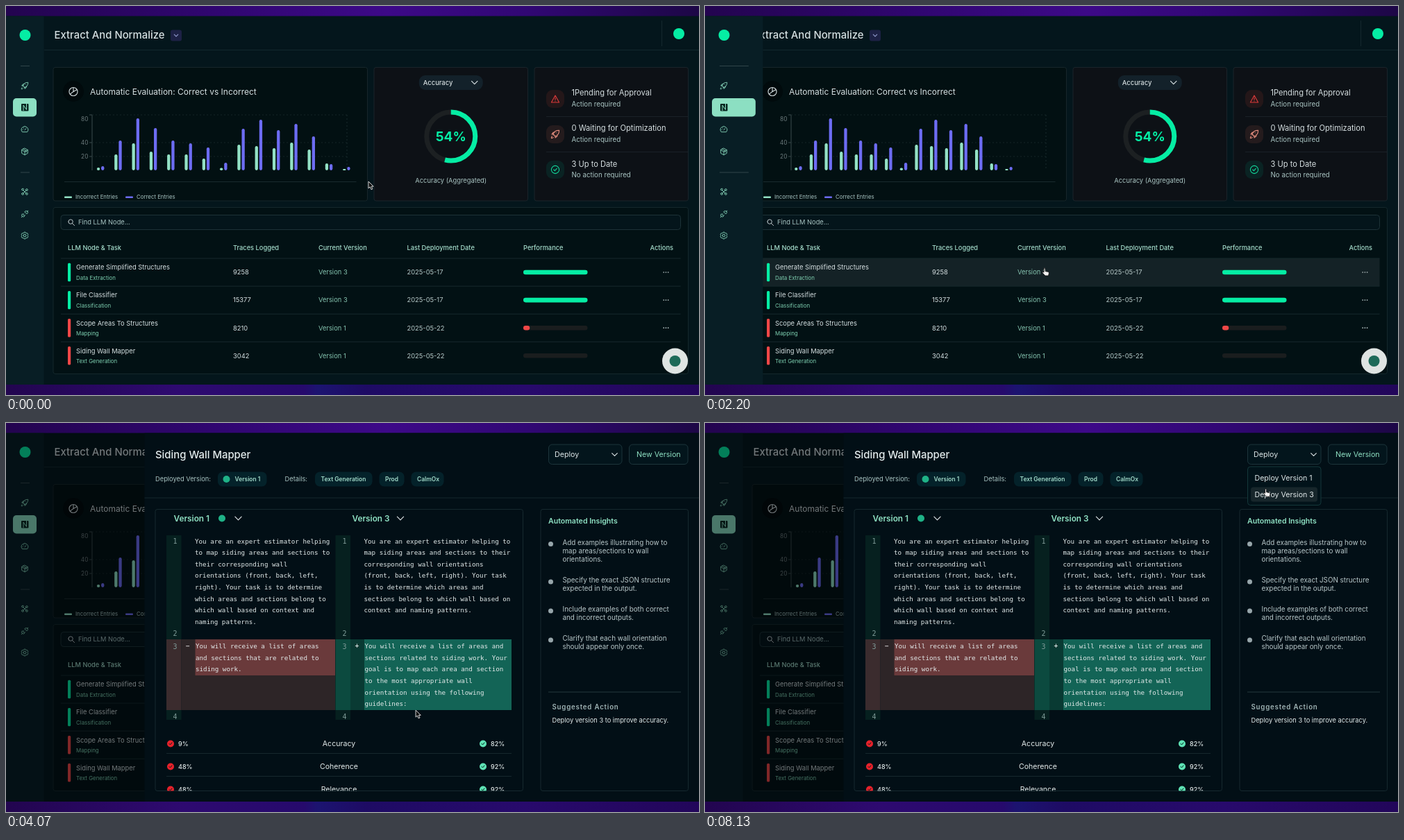
Recreate the animation shown at these times as an HTML page. Size 998 px wide and 561 px high, loop 8.2 s.

```html
<!DOCTYPE html>
<html lang="en">
<head>
<meta charset="utf-8">
<title>Node dashboard</title>
<style>
html, body { margin: 0; width: 100%; height: 100%; overflow: hidden; background: #04161c; }
svg { display: block; width: 998px; height: 561px; font-family: Inter, "Liberation Sans", sans-serif; }
.mono { font-family: "DejaVu Sans Mono", "Liberation Mono", monospace; }
.icon { fill: none; stroke-width: 1.9; stroke-linecap: round; stroke-linejoin: round; }
</style>
</head>
<body>
<svg viewBox="0 0 998 561">
  <defs>
    <linearGradient id="top">
      <stop offset="0" stop-color="#23044f"/><stop offset=".3" stop-color="#300670"/>
      <stop offset=".55" stop-color="#3d0988"/><stop offset=".75" stop-color="#310774"/>
      <stop offset="1" stop-color="#1d0746"/>
    </linearGradient>
    <linearGradient id="bottom">
      <stop offset="0" stop-color="#22054f"/><stop offset=".25" stop-color="#2e0a70"/>
      <stop offset=".43" stop-color="#260a6c"/><stop offset=".45" stop-color="#1c1470"/>
      <stop offset=".52" stop-color="#1e0b64"/><stop offset=".75" stop-color="#280a6c"/>
      <stop offset="1" stop-color="#22065a"/>
    </linearGradient>
    <clipPath id="app"><rect y="14.5" width="998" height="531.5"/></clipPath>
    <clipPath id="diffBox"><rect x="215" y="125" width="530" height="405.5"/></clipPath>
    <clipPath id="sideBox"><rect id="sideClip" y="60" width="54.5" height="486"/></clipPath>
  </defs>
  <rect width="998" height="16" fill="url(#top)"/>
  <rect y="544" width="998" height="17" fill="url(#bottom)"/>
  <g clip-path="url(#app)">
    <rect y="14" width="998" height="532" fill="#04161c"/>
    <g id="main"></g>
    <g id="side"></g>
    <rect id="shade" y="14" width="998" height="532"/>
    <g id="panel"></g>
  </g>
  <g id="cursor"></g>
</svg>
<script>
const LOOP = 8200;
const PANEL_AT = 2950, LOADED_AT = 3900, MENU_AT = 6000;
const OPEN_AT = 1000, CLOSE_AT = 1930;
const GREEN = '#05eda4', MINT = '#8fe0c3', PALE = '#d6dfe1', SOFT = '#a9c4c2', LINE = '#16292e', RED = '#f04747';

const $ = id => document.getElementById(id);
const clamp = v => Math.max(0, Math.min(1, v));
const mix = (a, b, p) => a + (b - a) * p;
const smooth = p => p * p * (3 - 2 * p);

// Text is placed by the middle of its capitals.
const text = (x, y, str, size, fill = PALE, attrs = '') =>
  `<text x="${x}" y="${y + size * .36}" font-size="${size}" fill="${fill}" ${attrs}>${str}</text>`;
const bold = (x, y, str, size, fill, weight = 600, attrs = '') =>
  text(x, y, str, size, fill, `font-weight="${weight}" ${attrs}`);
const box = (x, y, x2, y2, fill, r = 0, stroke = 'none') =>
  `<rect x="${x}" y="${y}" width="${x2 - x}" height="${y2 - y}" rx="${r}" fill="${fill}" stroke="${stroke}"/>`;
const line = (x, y, x2, y2, stroke = LINE, attrs = '') =>
  `<path d="M${x} ${y}L${x2} ${y2}" stroke="${stroke}" ${attrs}/>`;
const dot = (x, y, r, fill) => `<circle cx="${x}" cy="${y}" r="${r}" fill="${fill}"/>`;
const chevron = (x, y, r, stroke) =>
  `<path class="icon" d="M${x - r} ${y - r / 2}l${r} ${r}l${r} ${-r}" stroke="${stroke}" style="stroke-width:1.2"/>`;
const icon = (name, x, y, size, stroke) =>
  `<path class="icon" d="${ICONS[name]}" stroke="${stroke}" transform="translate(${x - size / 2} ${y - size / 2}) scale(${size / 24})"/>`;

const ICONS = {
  rocket: 'M9 15l-3-3c2-6 7-10 16-10c0 8-4 13-10 16zM9 12H3l4-5h4M12 15v6l5-4v-4M4 17c-2 1-2 5-2 5s4 0 5-2M15 8h.1',
  gauge: 'M4 19a10 10 0 1 1 16 0zM12 14l4-5M6 13h.1M9 8h.1',
  cube: 'M12 2l9 5v10l-9 5l-9-5V7zM3 7l9 5l9-5M12 12v10M7.500 4.500l9 5v4',
  nodes: 'M8 8l8 8M16 8l-8 8M3 5a3 3 0 1 0 6 0a3 3 0 1 0-6 0M15 6a3 3 0 1 0 6 0a3 3 0 1 0-6 0M3 18a3 3 0 1 0 6 0a3 3 0 1 0-6 0M15 18a3 3 0 1 0 6 0a3 3 0 1 0-6 0',
  plug: 'M2 22l4-4M6 12l6 6l-3 2q-3 1-5-1t-1-5zM12 6l6 6l3-3q1-3-1-5t-5-1zM18 6l4-4M9 11l-2 2M13 15l-2 2',
  gear: 'M9 4l1-2h4l1 2l3 1l2 0l2 4l-1 2v2l1 2l-2 4h-2l-3 1l-1 2h-4l-1-2l-3-1h-2l-2-4l1-2v-2l-1-2l2-4h2zM8 12a4 4 0 1 0 8 0a4 4 0 1 0-8 0',
  alert: 'M12 3L2 21h20zM12 9v5M12 17.500v.1',
  check: 'M2 12a10 10 0 1 0 20 0a10 10 0 1 0-20 0M8 12l3 3l5-6',
  pie: 'M2 12a10 10 0 1 0 20 0a10 10 0 1 0-20 0M12 2v10l9-5M12 12l-8 6',
  search: 'M3 10a7 7 0 1 0 14 0a7 7 0 1 0-14 0M15 15l7 7'
};

const BARS = [[4, 6], [23, 43], [39, 75], [27, 61], [23, 43], [23, 39], [17, 33], [3.500, 11],
  [37, 60], [35, 73], [32, 58], [40, 67], [30, 49], [10, 9], [2, 5]];
const ROWS = [
  ['Generate Simplified Structures', 'Data Extraction', 9258, 3, '2025-05-17', 1],
  ['File Classifier', 'Classification', 15377, 3, '2025-05-17', 1],
  ['Scope Areas To Structures', 'Mapping', 8210, 1, '2025-05-22', .1],
  ['Siding Wall Mapper', 'Text Generation', 3042, 1, '2025-05-22', 0]];

function chart(pick, step) {
  const axis = pick(124, 259.5), base = pick(237, 236), unit = pick(1, .83), right = pick(491, 565);
  const dash = 'stroke-dasharray="2 3"';
  let s = line(axis, base - 80 * unit, axis, base, '#3a4a4d') + line(right, base - 80 * unit, right, base, '#182a2c', dash);
  for (const v of [20, 40, 80]) {
    const y = base - v * unit;
    s += line(axis, y, right, y, '#142527', dash) + line(axis - 4, y, axis, y, '#3a4a4d');
    s += text(axis - 5.5, v === 80 ? y + 6 : y, v, pick(8.4, 7.4), '#6c7a7c', 'text-anchor="end"');
  }
  // Bars take their new width at once; only their spacing eases.
  const w = pick(4.3, 3.6), gap = pick(6.2, 5.2);
  BARS.forEach((pair, i) => pair.forEach((v, j) => {
    const x = axis + step * (.48 + i) + (j - .5) * gap;
    s += box(x - w / 2, base - v * unit, x + w / 2, base, j ? '#6d6cf3' : '#93e2c5', Math.min(w / 2, v * unit / 2));
  }));
  return s;
}

function statusCard(pick, left) {
  const x = pick(814.5, 850), ix = pick(791, 826);
  const entries = [
    ['alert', '#e23b3b', '#241719', ['1Pending for Approval'], 'Action required', pick(134, 133), pick(125, 124.5), pick(141, 140.5)],
    ['rocket', '#e08a7c', '#241b1d', pick(['0 Waiting for Optimization'], ['0 Waiting for', 'Optimization']), 'Action required', pick(185, 190.5), 176, pick(192, 203.5)],
    ['check', '#12d69a', '#0a2323', ['3 Up to Date'], 'No action required', pick(236, 247.5), pick(227.5, 239), pick(243.5, 255)]];
  let s = '';
  for (const [name, color, back, title, note, iy, ty, ny] of entries) {
    s += box(ix - 13, iy - 13, ix + 13, iy + 13, back, 9) + icon(name, ix, iy, 13.5, color);
    title.forEach((row, i) => s += text(x, ty + i * 12, row, 11.12));
    s += text(x, ny, note, 9.75, SOFT);
  }
  for (const y of pick([159.5, 210.5], [158.5, 221.5])) s += line(left + 17, y, 982, y, '#1a2127');
  return s;
}

function mainView(wide, step, hover) {
  const pick = (a, b) => wide ? b : a, dy = pick(0, 5.5), foot = 281 + dy;
  const left = pick(68, 210.5), [c1, c2, c3] = pick([520.5, 530, 751.5], [592, 601, 787]), right3 = pick(761, 797);
  const cols = pick([89, 327, 450, 577.5, 745], [232, 432, 535, 642, 783]);
  let s = line(pick(55, 184), 63.5, 998, 63.5, '#12272d') + line(944.5, 21, 944.5, 58, '#14282e');
  s += bold(left + 1.5, 42, 'Extract And Normalize', 14.87, PALE, 500);
  s += box(left + 169, 34.5, left + 185, 50.5, '#1d2145', 3) + chevron(left + 177, 42.5, 2.7, '#8f98c9');
  s += dot(969, 40, 8, GREEN);

  s += box(left, 88.5 + dy, c1, foot, '#021012', 3, '#17262a');
  s += dot(left + 29, 123 + dy, 15, '#010a0c') + icon('pie', left + 29, 123.5 + dy, 14.5, '#d0d8da');
  s += text(left + 53, 123.5 + dy, 'Automatic Evaluation: Correct vs Incorrect', 12);
  s += chart(pick, step);
  s += line(left + 16, 253.5 + dy, c1 - 16, 253.5 + dy, '#1a2b2e');
  s += box(left + 16, 274.5 + dy, left + 27, 277 + dy, '#93e2c5', 1) + text(left + 32, 275.5 + dy, 'Incorrect Entries', 7.85, SOFT);
  s += box(left + 104, 274.5 + dy, left + 115, 277 + dy, '#6d6cf3', 1) + text(left + 120, 275.5 + dy, 'Correct Entries', 7.85, SOFT);

  const mid = (c2 + c3) / 2, cy = 188 + dy;
  s += box(c2, 88.5 + dy, c3, foot, '#0d1116', 3, '#1a242a');
  s += box(mid - 46, 100 + dy, mid + 46, 121 + dy, '#13212a', 9) + bold(mid - 40, 110.5 + dy, 'Accuracy', 9.4, PALE, 500);
  s += chevron(mid + 34, 110.5 + dy, 4.2, PALE);
  s += `<circle cx="${mid}" cy="${cy}" r="35" fill="none" stroke="#1c2022" stroke-width="7"/>`;
  s += `<circle cx="${mid}" cy="${cy}" r="35" fill="none" stroke="${GREEN}" stroke-width="7" pathLength="100" stroke-dasharray="54 46" transform="rotate(-90 ${mid} ${cy})"/>`;
  s += bold(mid, cy, '54%', 19, GREEN, 700, 'text-anchor="middle"');
  s += text(mid, 252 + dy, 'Accuracy (Aggregated)', 9.34, SOFT, 'text-anchor="middle"');

  s += box(right3, 88.5 + dy, 982.5, foot, '#0d1116', 3, '#1a242a') + statusCard(pick, right3);

  let t = box(left, 290.5, 982.5, 530.5, '#021114', 3, '#14282c');
  t += box(left + 11, 301.5, 971.5, 322.5, '#04151b', 4, '#1d3237') + icon('search', left + 26, 312, 11, PALE);
  t += text(left + 36, 312, 'Find LLM Node...', 9.3, SOFT);
  ['LLM Node &amp; Task', 'Traces Logged', 'Current Version', 'Last Deployment Date', 'Performance'].forEach((name, i) =>
    t += bold(cols[i], 348.5, name, 9.27, '#a5dccb', 500));
  t += bold(927.5, 348.5, 'Actions', 9.27, '#a5dccb', 500);
  ROWS.forEach(([name, task, count, version, date, score], i) => {
    const y = 384 + i * 40.1, tone = i < 2 ? GREEN : RED;
    if (i === hover) t += box(left + 11, y - 20, 971.5, y + 20, '#142226');
    t += line(left + 11, y - 20, 971.5, y - 20, '#17292d');
    t += box(cols[0], y - 13.2, cols[0] + 4.2, y + 13.2, tone, 1.5);
    t += text(cols[0] + 12, y - 7, name, 9.34) + text(cols[0] + 12, y + 8, task, 7.9, '#7fd0b1');
    t += text(cols[1], y, count, 9.35) + text(cols[2], y, 'Version ' + version, 9.35, '#86c4b0') + text(cols[3], y, date, 9.35, '#b9cbca');
    t += box(cols[4], y - 3.3, cols[4] + 92.5, y + 3.3, '#1a1d1e', 3.3);
    if (score) t += box(cols[4], y - 3.3, cols[4] + 92.5 * score, y + 3.3, tone, 3.3);
    for (let d = 0; d < 3; d++) t += dot(947.2 + d * 3.2, y, .85, '#b9c5c6');
  });
  s += `<g transform="translate(0 ${dy})">${t}</g>`;
  return s + dot(963.5, 512, 18.5, '#dfe4e3') + dot(963.5, 512, 8, '#1d6a59');
}

const LINKS = [['rocket', 115, 'Agents'], ['', 146, 'Refinery'], ['gauge', 178, 'Evaluations'], ['cube', 210, 'Traces'],
  ['nodes', 268, 'Your Team'], ['plug', 300, 'Docs'], ['gear', 331, 'Settings']];

function sideView(width, labels) {
  let s = box(0, 14, width, 546, '#081e25') + dot(27.5, 42, 8, GREEN);
  s += box(10, 133, width - 10.5, 159.5, '#8cdfc2', 5);
  if (labels) s += bold(57, 42.5, 'JPlank', 9.25, MINT, 500) + chevron(96, 42, 3.6, MINT);
  let t = '';
  [['Dashboard', 86.5], ['General', 240]].forEach(([name, y]) =>
    t += labels ? text(10, y, name, 9.4, '#33484c') : line(21, y, width - 20.5, y, '#30454a'));
  for (const [name, y, label] of LINKS) {
    const ink = name ? '#86d3b8' : '#06251f';
    t += name ? icon(name, 27, y, 11.5, ink)
      : box(22, 141, 32.5, 151.5, ink, 1) + line(25, 143, 25, 151, '#8cdfc2') + line(25, 143, 29.5, 149.5, '#8cdfc2') + line(29.5, 141, 29.5, 149.5, '#8cdfc2');
    if (labels) t += text(39, y, label, 9.3, ink);
  }
  return s + `<g clip-path="url(#sideBox)">${t}</g>`;
}

const BEFORE = ['You are an expert estimator helping', 'to map siding areas and sections to', 'their corresponding wall',
  'orientations (front, back, left,', 'right). Your task is to determine', 'which areas and sections belong to',
  'which wall based on context and', 'naming patterns.'];
const AFTER = ['You are an expert estimator helping to', 'map siding areas and sections to their', 'corresponding wall orientations',
  '(front, back, left, right). Your task', 'is to determine which areas and', 'sections belong to which wall based on',
  'context and naming patterns.'];
const REMOVED = ['You will receive a list of areas', 'and sections that are related to', 'siding work.'];
const ADDED = ['You will receive a list of areas and', 'sections related to siding work. Your', 'goal is to map each area and section',
  'to the most appropriate wall', 'orientation using the following', 'guidelines:'];

function diffView(top) {
  const code = (x, y, rows) => rows.map((row, i) => text(x, y + i * 16.55, row, 9.22, '#e3eaea', 'class="mono"')).join('');
  const y3 = top + 151.5;
  let s = box(231, top - 8.5, 252.5, top + 257.5, '#06201f') + box(474.5, top - 8.5, 496, top + 257.5, '#06201f');
  s += box(231, y3 - 10, 252.5, y3 + 92, '#3b2c2e') + box(252.5, y3 - 10, 474, y3 + 92, '#2d2527') + box(272.5, y3 - 10, 474, y3 + 42, '#6a3a3b');
  s += box(474.5, y3 - 10, 496, y3 + 92, '#0c4a3f') + box(496, y3 - 10, 516, y3 + 92, '#093a33') + box(516, y3 - 10, 728, y3 + 92, '#136456');
  [0, 133, 151.5, 252.5].forEach((dy, i) => [240.5, 484.5].forEach(x =>
    s += text(x, top + dy, i + 1, 10, '#7f9b98', 'class="mono"')));
  s += text(259, y3, '−', 9.6, '#fff', 'class="mono"') + text(502.5, y3, '+', 9.6, '#fff', 'class="mono"');
  return s + code(272, top, BEFORE) + code(515.5, top, AFTER) + code(273, y3, REMOVED) + code(516.5, y3, ADDED);
}

function metricsView() {
  return [['Accuracy', 9, 82], ['Coherence', 48, 92], ['Relevance', 48, 92]].map(([name, a, b], i) => {
    const y = 462.5 + i * 33;
    const mark = (x, fill) => dot(x, y, 5, fill) + `<path class="icon" d="M${x - 2} ${y}l1.500 1.500l2.500-3" stroke="#04241d" style="stroke-width:1"/>`;
    return mark(237, '#e8212b') + mark(687, '#5fe3b5') + bold(248, y, a + '%', 9, '#e3eaea', 500) + bold(698, y, b + '%', 9, '#e3eaea', 500) +
      text(479.5, y, name, 10.6, '#e3eaea', 'text-anchor="middle"') + line(231, y + 14, 728, y + 14, '#16282d');
  }).join('');
}

const INSIGHTS = [[172, 'Add examples illustrating how to', 'map areas/sections to wall', 'orientations.'],
  [226.5, 'Specify the exact JSON structure', 'expected in the output.'],
  [268.5, 'Include examples of both correct', 'and incorrect outputs.'],
  [310.5, 'Clarify that each wall orientation', 'should appear only once.']];

function panelView(loaded, menu, item) {
  const pill = (x, x2, str, tx = x + 8.5) => box(x, 70.5, x2, 91.5, '#04222a', 7) + bold(tx, 81, str, 8.45, '#a3dccb');
  let s = box(199.5, 14, 1000, 546, '#020f16') + line(199.5, 108, 998, 108, '#14272d');
  s += bold(215, 45.5, 'Siding Wall Mapper', 14.87, '#e6edee', 500);
  s += box(781.5, 31, 887, 59.5, '#03151c', 5, '#1d353b') + text(790, 45.5, 'Deploy', 10.65, '#dfe7e8') + chevron(876.5, 45.5, 3.8, PALE);
  s += box(897.5, 31, 982, 59.5, '#03151c', 5, '#1d353b') + text(908, 45.5, 'New Version', 10.65, MINT);
  s += text(215, 81, 'Deployed Version:', 9.3, SOFT) + text(401.5, 81, 'Details:', 9.3, SOFT);
  s += pill(305, 375.5, 'Version 1', 329.5) + pill(445, 527.5, 'Text Generation') + pill(537.5, 573.5, 'Prod') + pill(583.5, 630.5, 'CalmOx');
  s += box(215, 124.5, 744.5, 530.5, '#020f16', 3, '#16292f') + box(770, 124.5, 982.5, 530.5, '#020f16', 3, '#16292f');

  const hy = loaded ? 137.5 : 170.5;
  let d = bold(241.5, hy, 'Version 1', 11.8, MINT) + bold(498.5, hy, 'Version 3', 11.8, MINT);
  d += chevron(334.5, hy, 4.6, PALE) + chevron(568, hy, 4.6, PALE) + diffView(loaded ? 170.5 : 231.5);
  if (loaded) {
    d += dot(311, hy, 5, '#1fb287') + metricsView();
    s += dot(317.5, 81, 5, '#1fb287');
  }
  s += `<g clip-path="url(#diffBox)">${d}</g>`;

  s += bold(781, 141.5, 'Automated Insights', 10.62, MINT);
  if (loaded) {
    for (const [y, ...rows] of INSIGHTS) {
      s += dot(784.5, y + 2.5, 3.5, '#97a6ab');
      rows.forEach((row, i) => s += text(801.5, y + i * 12, row, 9.83, '#b9c7c9'));
    }
  } else s += text(781, 166.5, 'Loading insights...', 10.6, '#8fc9b6');
  const ay = loaded ? 388 : 373.5;
  s += line(781, ay, 972, ay, '#24383d') + bold(786.5, ay + 22, 'Suggested Action', 9.7, '#9fb3b4', 600, 'letter-spacing=".8"');
  const advice = loaded ? ['Deploy version 3 to improve accuracy.'] : ['No action needed. Both versions perform', 'equally well in accuracy.'];
  advice.forEach((row, i) => s += text(786.5, ay + 40.5 + i * 14, row, 9.27, '#e3eaea'));

  if (menu) {
    s += box(781.5, 63, 887, 118.5, '#02131a', 4, '#14383a');
    [79, 103].forEach((y, i) => {
      if (i === item) s += box(786, y - 10.5, 882, y + 10.5, '#17262b', 4);
      s += text(791.5, y, 'Deploy Version ' + (i * 2 + 1), 10.62, '#dfe7e8');
    });
  }
  return s;
}

const POINTERS = {
  arrow: '<path d="M0 0v10l2.300-2.100l1.700 3.800l1.900-.8l-1.700-3.700h3z" fill="#111" stroke="#e8e8e8" stroke-width=".9"/>',
  hand: '<path d="M-1 1c0-1.600 2-1.600 2 0v3.500l3.700.8c1.500.3 1.800 1.200 1.600 2.600l-.7 3.100h-4.800l-3.600-4c-.8-1.200.5-2 1.800-.9z" fill="#f2f2f2" stroke="#111" stroke-width=".9"/>',
  beam: '<path d="M-2.500-5q2 0 2.500 1q.5-1 2.500-1M0-4v8M-2.500 5q2 0 2.500-1q.5 1 2.500 1M-1.500 1.500h3" fill="none" stroke="#c8d2d2" stroke-width="1"/>'
};
const SHAPES = [[0, 'arrow'], [940, 'hand'], [1900, 'arrow'], [2130, 'hand'], [3650, 'arrow'], [4600, 'beam'],
  [5150, 'arrow'], [5550, 'hand'], [6350, 'arrow'], [7650, 'hand']];
const ROUTE = [[0, 522, 253], [150, 515, 250], [950, 52, 150], [1070, 47, 148], [1600, 56, 160], [1930, 190, 245],
  [2200, 489, 378], [2750, 491, 495], [3600, 491, 495], [4600, 708, 318], [4930, 711, 315], [5700, 836, 47],
  [6150, 838, 47], [6800, 769, 91], [7200, 770, 96], [7800, 803, 97], [8200, 808, 95]];

function pointerAt(t) {
  const i = Math.max(1, ROUTE.findIndex(p => p[0] > t));
  const [a, b] = [ROUTE[i - 1], ROUTE[i]];
  const p = smooth((t - a[0]) / (b[0] - a[0]));
  return [mix(a[1], b[1], p), mix(a[2], b[2], p)];
}

const shown = {};
function show(id, html) {
  if (shown[id] !== html) $(id).innerHTML = shown[id] = html;
}

function render(t) {
  const [x, y] = pointerAt(t);
  const wide = t >= OPEN_AT && t < CLOSE_AT;
  const open = t < CLOSE_AT ? smooth(clamp((t - 1075) / 300)) : 1 - smooth(clamp((t - CLOSE_AT) / 390));
  const width = mix(54.5, 184, open);
  const relaid = t < OPEN_AT ? 1 : smooth(clamp((t - 2110) / 400));
  const row = t < PANEL_AT && x > 79 && y > 364 ? Math.floor((y - 364) / 40.1) : -1;

  $('sideClip').setAttribute('width', width);
  show('main', mainView(wide, mix(21.1, 25.3, relaid), row));
  show('side', sideView(width, wide));

  const slide = Math.pow(1 - clamp((t - PANEL_AT) / 583), 3);
  $('shade').setAttribute('fill', `rgba(0,4,6,${.47 * clamp((t - PANEL_AT) / 250)})`);
  $('panel').setAttribute('display', t < PANEL_AT ? 'none' : 'inline');
  $('panel').setAttribute('transform', `translate(${799 * slide} 0)`);
  const inMenu = t > MENU_AT && x > 786 && x < 882;
  const item = inMenu && y > 68 && y < 90 ? 0 : inMenu && y > 92 && y < 114 ? 1 : -1;
  show('panel', panelView(t >= LOADED_AT, t >= MENU_AT, item));

  show('cursor', POINTERS[SHAPES.filter(s => s[0] <= t).pop()[1]]);
  $('cursor').setAttribute('transform', `translate(${x} ${y})`);
}

const start = performance.now();
function tick() {
  render((performance.now() - start) % LOOP);
  requestAnimationFrame(tick);
}
tick();
</script>
</body>
</html>
```
